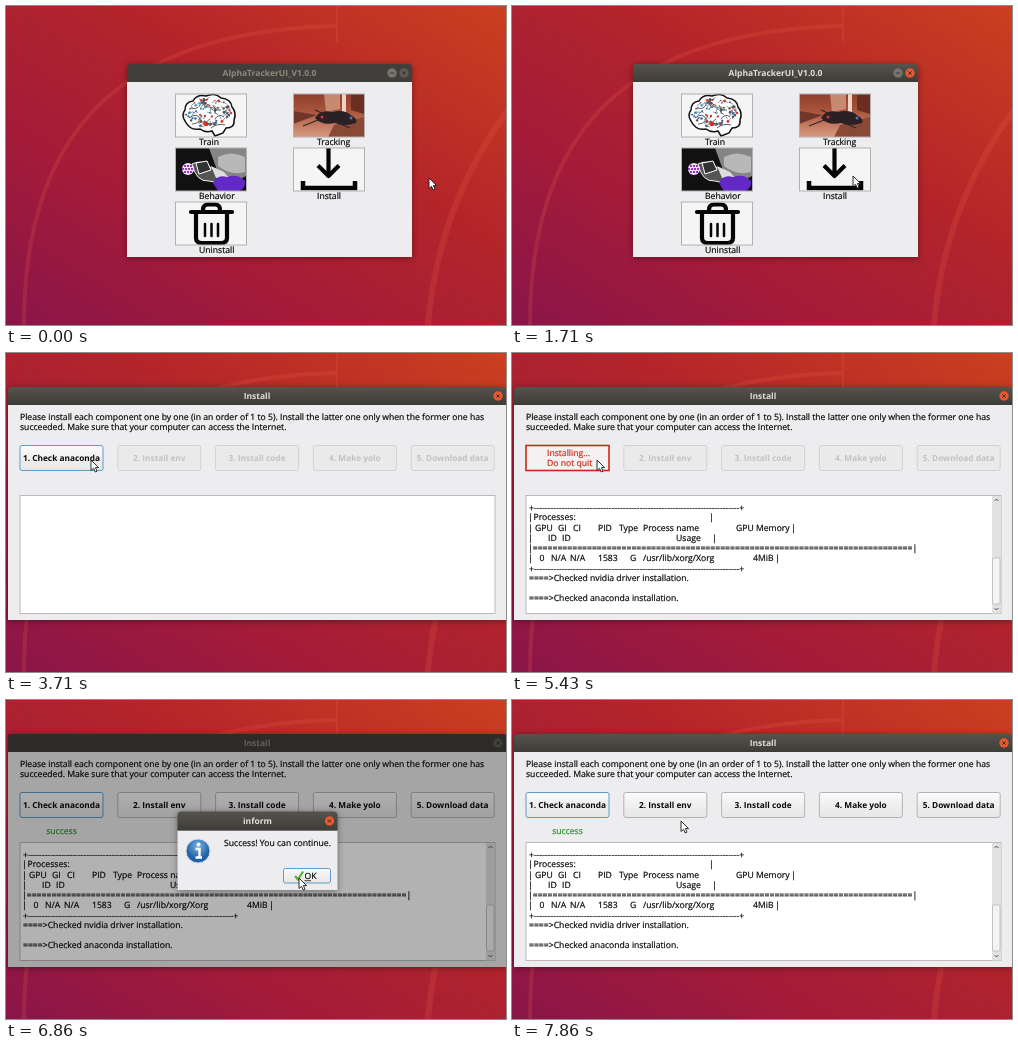
An HTML page that plays this animation: 500x319 px, repeating every 8 s.

```html
<!DOCTYPE html>
<html lang="en">
<head>
<meta charset="utf-8">
<title>Installer walkthrough</title>
<style>
  html, body { margin: 0; width: 100%; height: 100%; overflow: hidden; }
  svg { display: block; width: 100vw; height: 100vh; }
  text {
    font: 8.63px "Open Sans", sans-serif; text-rendering: geometricPrecision;
    color: #080808; fill: currentColor; stroke: currentColor; stroke-width: .2;
  }
  .bold { font-weight: 700; font-size: 8.3px; stroke: none; }
  .mid { text-anchor: middle; }
  .title { font-weight: 700; font-size: 8.5px; color: #e2dfd6; text-anchor: middle; stroke: none; }
  .window { filter: drop-shadow(0 1px 3px #0006); }
  .unfocused .title { color: #8d897f; }
  .unfocused .bar { fill: #403f3b; }
  .unfocused .close { fill: #5e5c55; }
  .disabled rect { fill: #ebeaeb; stroke: #d3d1d2; }
  .disabled text { color: #c3c1c2; }
  .busy text { color: #d02a18; }
  .success text { color: #26902b; }
</style>
</head>
<body>
<svg viewBox="0 0 500 319" preserveAspectRatio="none">
  <defs>
    <linearGradient id="sky" x1="0" y1="1" x2="1" y2="0">
      <stop offset="0" stop-color="#8a1549"/><stop offset=".3" stop-color="#a31b39"/>
      <stop offset=".62" stop-color="#b4252a"/><stop offset="1" stop-color="#ca401f"/>
    </linearGradient>
    <linearGradient id="bar" x2="0" y2="1">
      <stop offset="0" stop-color="#55534c"/><stop offset="1" stop-color="#3d3c37"/>
    </linearGradient>
    <linearGradient id="face" x2="0" y2="1">
      <stop offset="0" stop-color="#fbfafb"/><stop offset="1" stop-color="#e7e6e7"/>
    </linearGradient>
    <linearGradient id="room" x2="0" y2="1">
      <stop offset="0" stop-color="#8f3f2b"/><stop offset=".4" stop-color="#a9553d"/>
      <stop offset="1" stop-color="#d79b80"/>
    </linearGradient>
    <radialGradient id="info" cy=".3">
      <stop offset="0" stop-color="#7db4e2"/><stop offset="1" stop-color="#1f62a6"/>
    </radialGradient>
  </defs>

  <rect width="500" height="319" fill="url(#sky)"/>
  <g fill="none" stroke="#f0604a" stroke-opacity=".2">
    <path d="M18 319C18 130 110 25 330 20" stroke-width="4"/>
    <path d="M331 0V36" stroke-width="2"/>
    <path d="M422 319Q432 200 502 104" stroke-width="6"/>
  </g>

  <g id="home" class="window"></g>
  <g id="installer" class="window"></g>
  <rect id="dim" x="2" y="34" width="498" height="233"/>
  <g id="inform" class="window"></g>
  <path id="cursor" d="M0 0V10.5L2.5 8.3L4.2 12L6 11.2L4.4 7.6H7.6Z" fill="#fff" stroke="#1a1a1a" stroke-width=".9"/>
</svg>

<script>
const $ = id => document.getElementById(id);
const text = (x, y, s, cls = '') => `<text x="${x}" y="${y}" class="${cls}">${s}</text>`;
const rect = (x, y, w, h, rest) => `<rect x="${x}" y="${y}" width="${w}" height="${h}" ${rest}/>`;
const circle = (x, y, r, rest) => `<circle cx="${x}" cy="${y}" r="${r}" ${rest}/>`;
const path = (d, rest) => `<path d="${d}" ${rest}/>`;

let seed = 7;
const random = () => (seed = seed * 16807 % 2147483647) / 2147483647;

function frame(x, y, w, h, bar, title) {
  const cx = x + w - 8, cy = y + bar / 2;
  return rect(x, y + bar, w, h - bar, 'fill="#edecee"') +
    path(`M${x} ${y + bar}V${y + 4}q0-4 4-4H${x + w - 4}q4 0 4 4V${y + bar}Z`, 'class="bar" fill="url(#bar)"') +
    text(x + w / 2, cy + 3, title, 'title') +
    circle(cx, cy, 4.7, 'class="close" fill="#e9592f"') +
    path(`M${cx - 1.6} ${cy - 1.6}l3.2 3.2m0-3.2l-3.2 3.2`, 'stroke="#3b2a22"');
}

function brain() {
  let s = path('M179 115Q175 109 179 104Q179 96 187 95Q191 88 200 90Q209 86 215 92Q225 93 226 101Q231 107 228 114Q229 122 220 122L217 127L209 130L206 125Q199 127 194 123Q184 125 179 115Z',
    'fill="#fff" stroke="#111" stroke-width="1.5"') +
    path('M185 101q5 4 9-2m4-6q-3 8 5 8t6 7m-26 4q8-6 11 1t10 0m-18 5q7 0 8-6m13-13q2 6 8 5m-6 9q4-6 9-2m-13 11q6-5 14-3', 'fill="none" stroke="#333" stroke-width=".8"');
  for (let i = 0; i < 72; i++) {
    const a = random() * 6.283, r = Math.sqrt(random());
    const x = 203 + 23 * r * Math.cos(a), y = 107 + 14 * r * Math.sin(a);
    s += path(`M${x} ${y}l${8 * random() - 4} ${8 * random() - 4}`, 'stroke="#333" stroke-width=".5"') +
      circle(x, y, .7 + .8 * random(), `fill="${['#d83a32', '#2f69b1', '#58a4c4', '#555'][i % 4]}"`);
  }
  return s + circle(200, 118, 2.3, 'fill="#e0271f"');
}

function trackingPhoto() {
  return rect(287, 88, 71, 43, 'fill="url(#room)"') +
    path('M318 88H334V103L320 106Z', 'fill="#c58a70"') +
    path('M336 88h4v20h-4Z', 'fill="#efd3c4"') +
    path('M345 88H358V108L345 104Z', 'fill="#6b2f22"') +
    path('M287 105L311 109L287 118Z', 'fill="#70362a"') +
    path('M328 119L358 111V131H322Z', 'fill="#8a4935"') +
    path('M309 112Q314 103 326 106Q339 103 346 110Q352 113 350 117Q337 121 329 117Q316 120 309 112Z', 'fill="#2b2024"') +
    path('M297 120l15-6m-3-10l9 4m14 9l12 5', 'stroke="#30262a" stroke-width="1.3"') +
    circle(316, 111, 1.5, 'fill="#d33"') + circle(345, 112, 1.5, 'fill="#4679c0"');
}

function behaviorPhoto() {
  return rect(169, 142, 71, 43, 'fill="#111"') +
    path('M203 142H240V170Q222 180 211 164Z', 'fill="#858585"') +
    path('M212 151Q225 144 239 151V166Q225 170 212 160Z', 'fill="#b8b8b8"') +
    path('M186 158Q196 153 204 161L222 171Q217 179 203 175Q190 176 186 158Z', 'fill="#555" stroke="#eee"') +
    path('M190 157l11-2 4 9-12 4Z', 'fill="#333" stroke="#fff"') +
    path('M205 160L218 166L222 171L210 172Z', 'fill="#ddd"') +
    path('M207 177Q211 168 221 171Q232 167 239 175Q240 182 233 185H212Z', 'fill="#6329c7"') +
    circle(182, 163, 6, 'fill="#eee5fa"') +
    path('M178 160h9m-11 3h12m-10 3h8', 'stroke="#a02fc8" stroke-width="2" stroke-dasharray="2 1"');
}

const thick = 'fill="none" stroke="#050505" stroke-width="4.2" stroke-linejoin="round"';
const downloadIcon = path('M322.5 142V169M312 159.5L322.5 170L333 159.5', thick) +
  path('M297 175V182H349V175', 'fill="none" stroke="#050505" stroke-width="4.5"');
const trashIcon = path('M185 206H226M197 204Q197 198.5 202 198.5H209Q214 198.5 214 204', thick + ' stroke-linecap="round"') +
  path('M190 207V232Q190 237 196 237H215Q221 237 221 232V207', thick) +
  path('M199 218V230M205.5 218V230M212 218V230', 'stroke="#050505" stroke-width="2.5" stroke-linecap="round"');

const tile = (x, y, art, label) => rect(x, y, 71, 43, 'fill="#f6f5f6"') + art +
  rect(x, y, 71, 43, 'fill="none" stroke="#b2b0b0"') + text(x + 23.5, y + 51, label);

$('home').innerHTML = frame(121, 58, 285, 193, 18, 'AlphaTrackerUI_V1.0.0') +
  circle(386, 67, 4.7, 'fill="#77746b"') + path('M384 67h4', 'stroke="#3b3a36"') +
  tile(169.5, 88, brain(), 'Train') + tile(287.5, 88, trackingPhoto(), 'Tracking') +
  tile(169.5, 142, behaviorPhoto(), 'Behavior') + tile(287.5, 142, downloadIcon, 'Install') +
  tile(169.5, 196, trashIcon, 'Uninstall');

const button = (i, label) => `<g id="step${i}">` +
  rect(14 + 97.8 * i, 92.5, 83, 25, 'rx="2" fill="url(#face)" stroke="#b5b3b4"') +
  text(55.5 + 97.8 * i, 108, label, 'bold mid') + '</g>';

const row = (y, ...cells) => cells.map(([x, s]) => text(x, y, s)).join('');
const rule = y => row(y, [17, '+' + '-'.repeat(74) + '+']);
const log = rule(157.5) +
  row(167, [16, '|'], [21.5, 'Processes:'], [197, '|']) +
  row(177.5, [16, '|'], [23, 'GPU'], [46, 'GI'], [61, 'CI'], [86, 'PID'], [107, 'Type'], [131, 'Process name'], [224, 'GPU Memory'], [279, '|']) +
  row(187.5, [16, '|'], [36, 'ID'], [50, 'ID'], [164, 'Usage'], [200, '|']) +
  row(198, [16, '|' + '='.repeat(77) + '|']) +
  row(208, [16, '|'], [27.5, '0'], [39, 'N/A'], [58, 'N/A'], [86, '1583'], [118, 'G'], [131, '/usr/lib/xorg/Xorg'], [241, '4MiB'], [263, '|']) +
  rule(218.5) +
  row(228, [17, '====&gt;Checked nvidia driver installation.']) +
  row(248, [17, '====&gt;Checked anaconda installation.']) +
  rect(480, 143, 8.5, 117.5, 'fill="#e2e0e1"') +
  rect(480.5, 205, 7.5, 46, 'rx="1" fill="#f5f4f5" stroke="#b9b7b8" stroke-width=".8"') +
  path('M482.5 148l2-2 2 2m-4 107l2 2 2-2', 'fill="none" stroke="#555"');

$('installer').innerHTML = frame(2, 34, 498, 233, 18, 'Install') +
  text(14, 66.5, 'Please install each component one by one (in an order of 1 to 5). Install the latter one only when the former one has') +
  text(14, 76.5, 'succeeded. Make sure that your computer can access the Internet.') +
  ['1. Check anaconda', '2. Install env', '3. Install code', '4. Make yolo', '5. Download data']
    .map((label, i) => button(i, label)).join('') +
  '<g id="busy" class="busy">' + rect(14, 92.5, 83, 25, 'fill="#f3f1f2" stroke="#d0261a" stroke-width="1.6"') +
  text(35, 103, 'Installing...') + text(35, 112.5, 'Do not quit') + '</g>' +
  '<g id="success" class="success">' + text(55.5, 133.5, 'success', 'mid') + '</g>' +
  rect(14, 142.5, 475, 118, 'fill="#fff" stroke="#bcbabb"') + `<g id="log">${log}</g>`;
$('step0').firstChild.setAttribute('stroke', '#5b9ccb');

$('inform').innerHTML = frame(171.5, 111.5, 160, 78.5, 19, 'inform') +
  circle(192, 151, 12, 'fill="url(#info)" stroke="#d5dde5"') +
  circle(192.5, 144.5, 1.9, 'fill="#fff"') + path('M189.5 149H193.5V157.5M189.5 157.5H196', 'fill="none" stroke="#fff" stroke-width="2.4"') +
  text(218, 146, 'Success! You can continue.') +
  rect(277.5, 168.5, 47, 14.5, 'rx="2" fill="url(#face)" stroke="#5f9cc9"') +
  path('M289 176l3 3.5 5-8', 'fill="none" stroke="#5cae35" stroke-width="2.2"') +
  text(298.5, 179, 'OK') + path('M298.5 180.7h6.5', 'stroke="#111" stroke-width=".8"');

// Cursor stops: time, x, y
const stops = [[0, 423, 172], [430, 423, 172], [1500, 341, 170], [2290, 341, 170], [3430, 85, 107],
  [6000, 85, 107], [6710, 293, 178], [7290, 293, 178], [7860, 169, 121], [8000, 169, 121]];
const clamp = v => Math.max(0, Math.min(1, v));
const ease = p => p * p * (3 - 2 * p);

function cursorAt(t) {
  const i = stops.findIndex(s => s[0] > t);
  const [t0, x0, y0] = stops[i - 1], [t1, x1, y1] = stops[i];
  const p = ease((t - t0) / (t1 - t0));
  return [x0 + (x1 - x0) * p, y0 + (y1 - y0) * p];
}

const show = (id, on) => $(id).style.display = on ? '' : 'none';

function draw(now) {
  const t = Math.floor((now % 8000 + 5) * 7 / 1000) % 56 * 1000 / 7;
  const opened = t >= 1990, installing = t >= 3850 && t < 5700, done = t >= 5700;
  show('home', !opened);
  show('installer', opened);
  $('home').classList.toggle('unfocused', t < 140);
  show('busy', installing);
  show('step0', !installing);
  show('success', done);
  show('log', t >= 4700);
  for (let i = 1; i < 5; i++) $('step' + i).classList.toggle('disabled', !done);

  const asking = done && t < 7130;
  show('inform', asking);
  $('installer').classList.toggle('unfocused', asking);
  const shade = clamp((t - 5570) / 500) * (1 - clamp((t - 7130) / 300));
  $('dim').setAttribute('opacity', .3 * shade);

  const [x, y] = cursorAt(t);
  $('cursor').setAttribute('transform', `translate(${x.toFixed(1)} ${y.toFixed(1)})`);
  requestAnimationFrame(draw);
}
requestAnimationFrame(draw);
</script>
</body>
</html>
```
